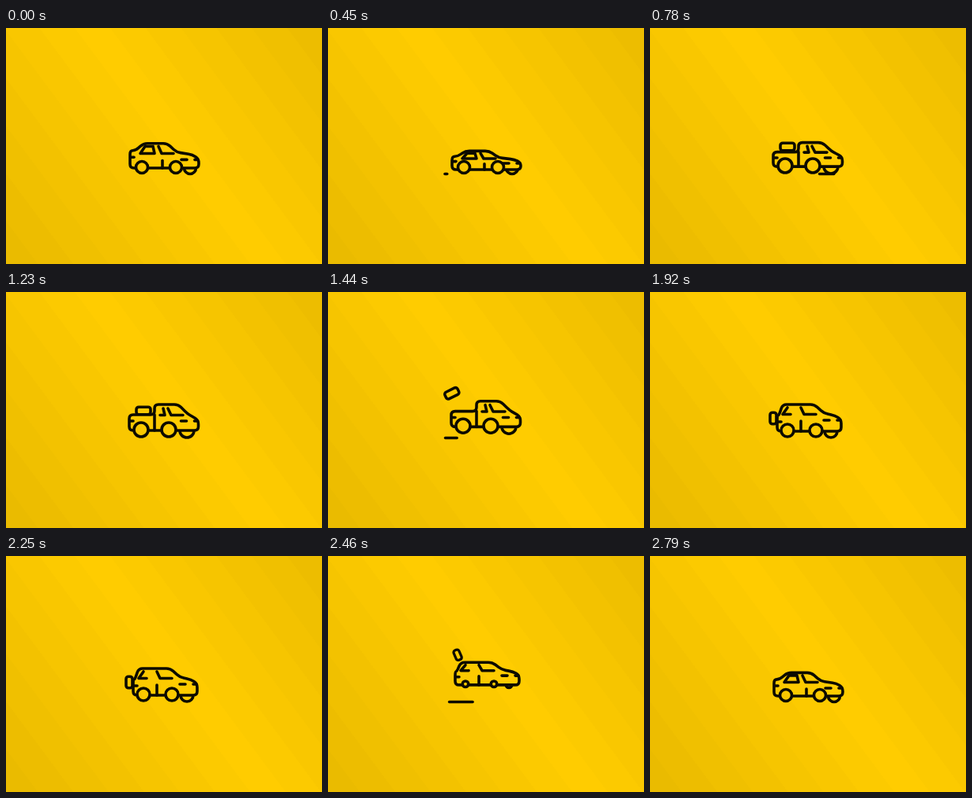
An HTML page with a canvas for the animation above (2820 ms loop, 400 by 300 pixels).

```html
<!DOCTYPE html>
<html lang="en">
<head>
<meta charset="utf-8">
<title>Changing cars</title>
<style>
html, body { margin: 0; width: 100%; height: 100%; overflow: hidden; background: #fc0; }
canvas { display: block; width: 400px; height: 300px; }
</style>
</head>
<body>
<canvas id="stage" width="400" height="300"></canvas>
<script>
const ctx = document.getElementById('stage').getContext('2d');
const LOOP = 2820, STEP = 940, GROUND = 178, INK = '#0d0b00';

// Slanting bands, each a little darker the farther it is from the bright one
function makePaper() {
  const nx = 0.804, ny = -0.595, band = 36, peak = 88, side = 8;
  const from = peak - (side + 0.5) * band, to = peak + (side + 0.5) * band;
  const fill = ctx.createLinearGradient(from * nx, from * ny, to * nx, to * ny);
  const count = 2 * side + 1;
  for (let i = 0; i < count; i++) {
    const n = Math.abs(i - side);
    const color = `rgb(${255 - 3 * n}, ${204 - 2.5 * n}, 0)`;
    fill.addColorStop(i / count, color);
    fill.addColorStop((i + 1) / count, color);
  }
  return fill;
}
const paper = makePaper();

// glass: x of the rear window's corners (two at the top, two below);
// seal: 1 closes that window, 0 leaves it open
const cars = [
  { left: 157, right: 244, base: 178, deck: 164, deckY: 157, roof: 148.5, roof0: 174, roof1: 204,
    belt: 159, pillar: 193, door: 198, doorTop: 169, seal: 1, glass: [186, 176, 170, 188],
    wheel1: 172, wheel2: 215, wheel3: 233, radius: 7.5 },
  { left: 156, right: 243.5, base: 176, deck: 188, deckY: 156, roof: 143, roof0: 188, roof1: 218,
    belt: 155, pillar: 205, door: 188, doorTop: 156, seal: 0, glass: [199, 199, 201, 195],
    wheel1: 171, wheel2: 206, wheel3: 229, radius: 9 },
  { left: 161, right: 242, base: 177, deck: 163, deckY: 157, roof: 143, roof0: 168, roof1: 208,
    belt: 154, pillar: 191, door: 191, doorTop: 164, seal: 0, glass: [174, 174, 168, 178],
    wheel1: 174, wheel2: 210, wheel3: 229, radius: 8 }
];

const lerp = (a, b, k) => a + (b - a) * k;
const blend = (a, b, k) => Array.isArray(a) ? a.map((v, i) => lerp(v, b[i], k)) : lerp(a, b, k);
const span = (t, from, to) => Math.min(1, Math.max(0, (t - from) / (to - from)));
const ramp = (t, from, to) => (1 - Math.cos(Math.PI * span(t, from, to))) / 2;
const arch = k => Math.sin(Math.PI * k);
// Soft bump from 0 to 1 and back around a moment
const bump = (t, mid, width) => 1 - ramp(Math.abs(t - mid), 0, width);

function paint(fill) {
  if (fill) {
    ctx.fillStyle = paper;
    ctx.fill();
  }
  ctx.stroke();
}

function line(...pts) {
  ctx.beginPath();
  pts.forEach(p => ctx.lineTo(...p));
  paint();
}

// Closed outline with softened corners
function shell(pts, soft) {
  const toward = (p, q) => {
    const k = Math.min(0.5, soft / (Math.hypot(q[0] - p[0], q[1] - p[1]) || 1));
    return [lerp(p[0], q[0], k), lerp(p[1], q[1], k)];
  };
  const n = pts.length;
  ctx.beginPath();
  pts.forEach((p, i) => {
    ctx.lineTo(...toward(p, pts[(i + n - 1) % n]));
    ctx.quadraticCurveTo(...p, ...toward(p, pts[(i + 1) % n]));
  });
  ctx.closePath();
  paint(true);
}

function wheel(x, y, r) {
  ctx.beginPath();
  ctx.arc(x, y, r, 0, 7);
  paint(true);
}

function box(x, y, w, h, turn, size) {
  if (size < 0.02) return;
  ctx.save();
  ctx.translate(x, y);
  ctx.rotate(turn);
  ctx.scale(size, size);
  ctx.beginPath();
  ctx.roundRect(-w / 2, -h / 2, w, h, 3);
  paint();
  ctx.restore();
}

// Falls onto the pickup, later tumbles off to the left
function cargo(t) {
  const on = ramp(t, 620, 760), off = ramp(t, 1370, 1560);
  box(174 - 56 * off, 122 + 29 * on - 27 * arch(off), 18, 9.5, -1.5 * off, on * (1 - off ** 4));
}

// Drops to the tail, later hops forward into the car
function spare(t) {
  const above = 1 - ramp(t, 1560, 1740), off = ramp(t, 2340, 2570);
  box(156 + 12 * above + 15 * off, 160.5 - 49 * above - 35 * arch(off), 8, 14.5,
    0.7 * above - 0.75 * off, Math.min(1, 3 - 3 * above) * (1 - off ** 4));
}

function dash(p) {
  const k = span(p, 440, 830);
  if (k > 0 && k < 1) line([148 + 97 * k ** 2.8, 185.5], [148 + 97 * k, 185.5]);
}

function drawCar(c, p) {
  const crouch = bump(p, 450, 60), air = bump(p, 600, 100);
  const hop = -14 * arch(span(p, 470, 750));
  const stretch = 1 - 0.2 * crouch - 0.17 * air - 0.12 * bump(p, 800, 45)
    + 0.06 * (bump(p, 0, 35) + bump(p, STEP, 35));
  const roll = 1 - 0.58 * air + 0.1 * bump(p, 710, 40);
  const at = (x, y) => [x, GROUND + (y - GROUND) * stretch + hop + 2 * crouch];
  const { left, right, base, belt, roof, deckY, pillar, door } = c;
  const top = belt - 7, sill = belt + 1.5, lamp = belt + 9, axle = base - 1 + hop;

  wheel(c.wheel3, axle + 1, c.radius * roll);
  shell([
    at(left, base), at(left, deckY), at(c.deck, deckY), at(c.roof0, roof), at(c.roof1, roof),
    at(c.roof1 + 12, belt), at(right - 8, belt + 3), at(right, belt + 8), at(right, base)
  ], 5);

  const [a, b, d, e] = c.glass;
  line(at(a, top), at(b, top), at(d, sill), at(e, sill),
    at(lerp(e, a, c.seal), lerp(sill, top, c.seal)));
  line(at(pillar, top), at(pillar + 4, sill), at(pillar + 19, sill));
  line(at(door, c.doorTop), at(door, base));
  line(at(left + 1, deckY + 8), at(left + 5, deckY + 8));
  line(at(right - 22, lamp), at(right - 15, lamp));
  line(at(right - 5, lamp), at(right - 1, lamp));

  wheel(c.wheel1, axle, c.radius * roll);
  wheel(c.wheel2, axle, c.radius * roll);
}

function draw(t) {
  const step = Math.floor(t / STEP), p = t % STEP;
  const now = cars[step], next = cars[(step + 1) % cars.length];
  const mix = ramp(p, 575, 750);
  const car = {};
  for (const name in now) car[name] = blend(now[name], next[name], mix);

  ctx.fillStyle = paper;
  ctx.fillRect(0, 0, 400, 300);
  ctx.strokeStyle = INK;
  ctx.lineWidth = 3.6;
  ctx.lineCap = ctx.lineJoin = 'round';
  dash(p);
  cargo(t);
  spare(t);
  drawCar(car, p);
}

const start = performance.now();
function frame() {
  draw((performance.now() - start) % LOOP);
  requestAnimationFrame(frame);
}
frame();
</script>
</body>
</html>
```
